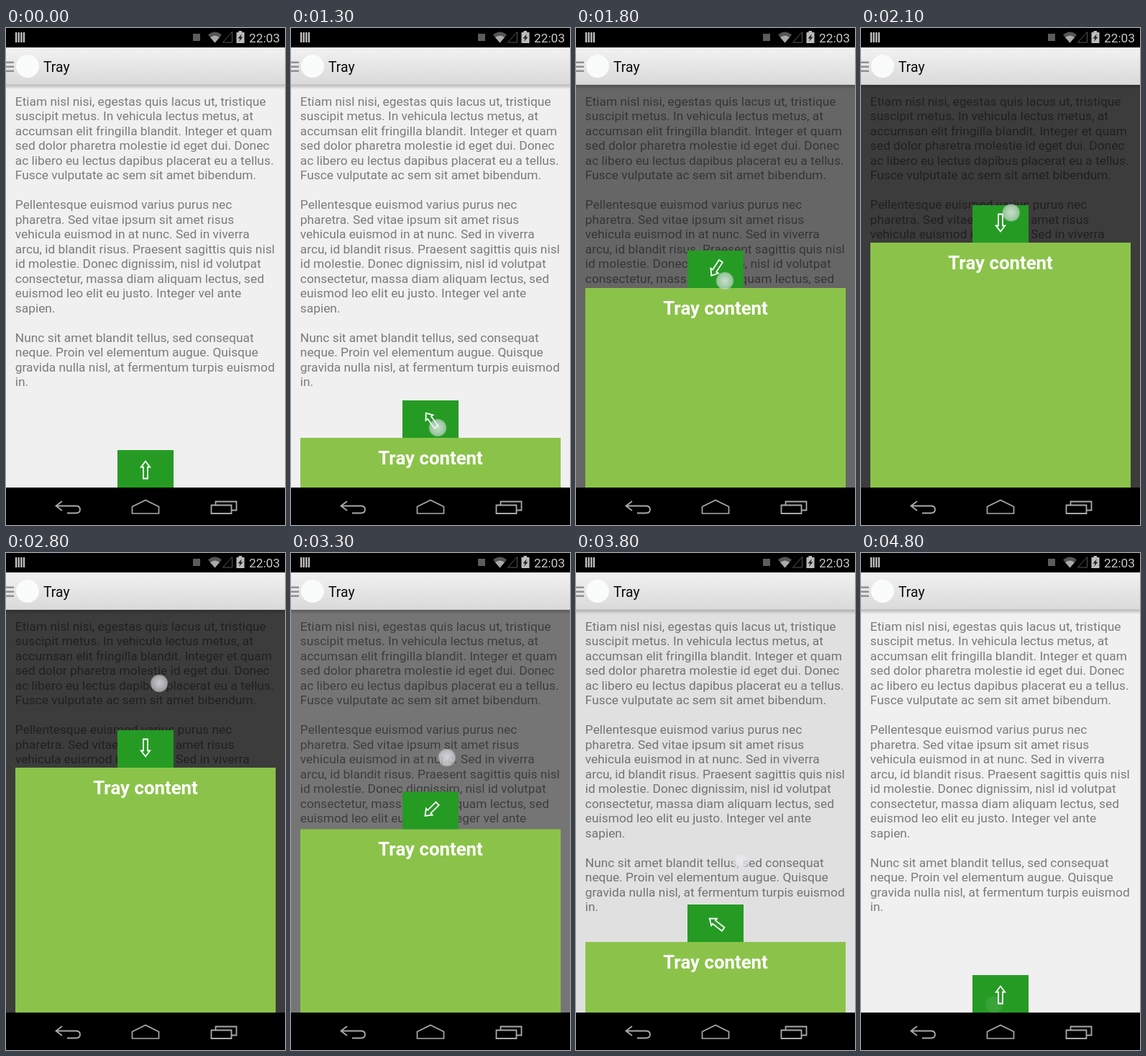
Recreate the animation shown at these times as an HTML page with a canvas. Size 388 px wide and 690 px high, loop 4900 ms.

```html
<!DOCTYPE html>
<html lang="en">
<head>
<meta charset="utf-8">
<title>Tray</title>
<style>
html, body { margin: 0; width: 100%; height: 100%; overflow: hidden; background: #000; }
canvas { display: block; }
</style>
</head>
<body>
<canvas id="stage" width="388" height="690"></canvas>
<script>
const c = document.getElementById('stage').getContext('2d');
const LOOP = 4900, STEP = 100;
const CLOSED = 638, OPEN = 298, BAR = 79;
const FONT = 'Roboto, "Noto Sans", sans-serif';

const lines = `Etiam nisl nisi, egestas quis lacus ut, tristique
suscipit metus. In vehicula lectus metus, at
accumsan elit fringilla blandit. Integer et quam
sed dolor pharetra molestie id eget dui. Donec
ac libero eu lectus dapibus placerat eu a tellus.
Fusce vulputate ac sem sit amet bibendum.

Pellentesque euismod varius purus nec
pharetra. Sed vitae ipsum sit amet risus
vehicula euismod in at nunc. Sed in viverra
arcu, id blandit risus. Praesent sagittis quis nisl
id molestie. Donec dignissim, nisl id volutpat
consectetur, massa diam aliquam lectus, sed
euismod leo elit eu justo. Integer vel ante
sapien.

Nunc sit amet blandit tellus, sed consequat
neque. Proin vel elementum augue. Quisque
gravida nulla nisl, at fermentum turpis euismod
in.`.split('\n');

// Keys are [time, value]
const trayY = [[0, 638], [900, 638], [1100, 624], [1300, 569], [1800, 361], [2000, 298], [2850, 298],
  [3200, 357], [3500, 448], [3800, 540], [4100, 620], [4250, 638], [4900, 638]];
const touchX = [[0, 200], [800, 200], [1300, 204], [1800, 207], [2800, 213], [3500, 219],
  [3800, 229], [4100, 228], [4800, 185], [4900, 185]];
const touchY = [[0, 612], [800, 612], [1000, 606], [1300, 555], [1800, 351], [2000, 285], [2400, 190],
  [2600, 178], [2800, 181], [3200, 257], [3500, 346], [3800, 427], [4200, 535], [4600, 617], [4800, 627], [4900, 627]];
const touchAlpha = [[0, 0], [700, 0], [800, .7], [900, 1], [4500, 1], [4800, .15], [4900, 0]];

const clamp = v => Math.max(0, Math.min(1, v));

// Monotone cubic through the keys
function at(keys, t) {
  let i = 0;
  while (i < keys.length - 2 && keys[i + 1][0] <= t) i++;
  const secant = k => keys[k + 1] && keys[k]
    ? (keys[k + 1][1] - keys[k][1]) / (keys[k + 1][0] - keys[k][0]) : 0;
  const slope = k => {
    const a = secant(k - 1), b = secant(k);
    return a * b <= 0 ? 0 : 2 * a * b / (a + b);
  };
  const [t0, v0] = keys[i], [t1, v1] = keys[i + 1];
  const d = t1 - t0, u = (t - t0) / d, w = 1 - u;
  return w * w * (1 + 2 * u) * v0 + u * u * (1 + 2 * w) * v1
    + d * u * w * (w * slope(i) - u * slope(i + 1));
}

function rect(x, y, w, h, fill) {
  c.fillStyle = fill;
  c.fillRect(x, y, w, h);
}

function fade(y0, y1, from, to) {
  const g = c.createLinearGradient(0, y0, 0, y1);
  g.addColorStop(0, from);
  g.addColorStop(1, to);
  rect(0, y0, 388, y1 - y0, g);
}

function text(str, x, y, size, fill, weight = 400, align = 'left') {
  c.font = `${weight} ${size}px ${FONT}`;
  c.textAlign = align;
  c.fillStyle = fill;
  c.fillText(str, x, y);
}

function disc(x, y, r, fill) {
  c.fillStyle = fill;
  c.beginPath();
  c.arc(x, y, r, 0, 7);
  c.fill();
}

function stroke(d, color, width) {
  c.strokeStyle = color;
  c.lineWidth = width;
  c.stroke(new Path2D(d));
}

function fill(d, color) {
  c.fillStyle = color;
  c.fill(new Path2D(d));
}

function page(dim) {
  rect(0, BAR, 388, CLOSED - BAR, '#f0f0f0');
  lines.forEach((s, i) => text(s, 12.8, 108 + i * 20.48, 17.35, '#7b7b7b'));
  fade(BAR, BAR + 6, 'rgba(0,0,0,.22)', 'rgba(0,0,0,0)');
  rect(0, BAR, 388, CLOSED - BAR, `rgba(0,0,0,${dim})`);
}

function tray(y, open) {
  rect(13, y, 362, CLOSED - y, '#8bc34a');
  text('Tray content', 194, y + 37, 25.8, '#fff', 700, 'center');
  rect(155, y - 52, 78, 52, '#259b24');
  c.save();
  c.translate(194, y - 26);
  c.rotate(-Math.PI * open);
  stroke('M0-10.5L6.2-2.5H3V13.5H-3V-2.5H-6.2Z', '#fff', 1.8);
  c.restore();
}

function statusBar() {
  rect(0, 0, 388, 27, '#000');
  for (let i = 0; i < 4; i++) rect(13 + i * 3.6, 6, 2.3, 14, '#c4c4c4');
  rect(260, 8, 10, 10, '#5c5c5c');
  fill('M281 9.5Q290.500 1.500 300 9.500L290.500 20.500Z', '#555');
  fill('M284 13Q290.500 8 297 13L290.500 20.500Z', '#aaa');
  stroke('M314.500 5.500V20H301.500Z', '#555', 1);
  fill('M323.500 4H328V6H331.500V21H320.500V6H323.500Z', '#bdbdbd');
  fill('M328 8L322.500 14.500H325.500L324 19L329.500 12.500H326.500Z', '#222');
  text('22:03', 338, 20, 17.3, '#c8c8c8');
}

function actionBar() {
  fade(27, BAR, '#f2f2f2', '#d9d9d9');
  rect(0, BAR - 1, 388, 1, '#c6c6c6');
  for (const y of [46.5, 52.5, 58.5]) rect(0, y, 11, 2.5, '#919191');
  disc(30, 53, 16, '#fafbfb');
  text('Tray', 52, 60.5, 19.4, '#0a0a0a');
}

function navBar() {
  rect(0, CLOSED, 388, 52, '#000');
  const grey = '#aaa';
  stroke('M78 657L69.500 663.500L78 670M70 663.500H97Q103 663.500 103 668.500T97 673.500H85', grey, 1.8);
  stroke('M175.500 674V664.500L194 655.500L212.500 664.500V674Z', grey, 1.7);
  stroke('M285.500 662.500H313.500V674H285.500ZM291.500 662V657.500H320.500V669.500H314', grey, 1.8);
}

function touch(x, y, alpha) {
  if (alpha <= 0) return;
  const g = c.createRadialGradient(x, y, 0, x, y, 12.5);
  g.addColorStop(0, 'rgba(240,240,244,.8)');
  g.addColorStop(.55, 'rgba(232,232,238,.68)');
  g.addColorStop(.88, 'rgba(222,222,230,.6)');
  g.addColorStop(1, 'rgba(215,215,225,.2)');
  c.globalAlpha = alpha;
  disc(x, y, 12.5, g);
  c.globalAlpha = 1;
}

function draw(now) {
  const t = Math.floor(now % LOOP / STEP) * STEP;
  const y = at(trayY, t), open = (CLOSED - y) / (CLOSED - OPEN);
  page(.75 * clamp((open - .22) / .78));
  tray(y, open);
  statusBar();
  actionBar();
  navBar();
  touch(at(touchX, t), at(touchY, t), at(touchAlpha, t));
}

let start;
function tick(now) {
  start ??= now;
  draw(now - start);
  requestAnimationFrame(tick);
}
requestAnimationFrame(tick);
</script>
</body>
</html>
```
